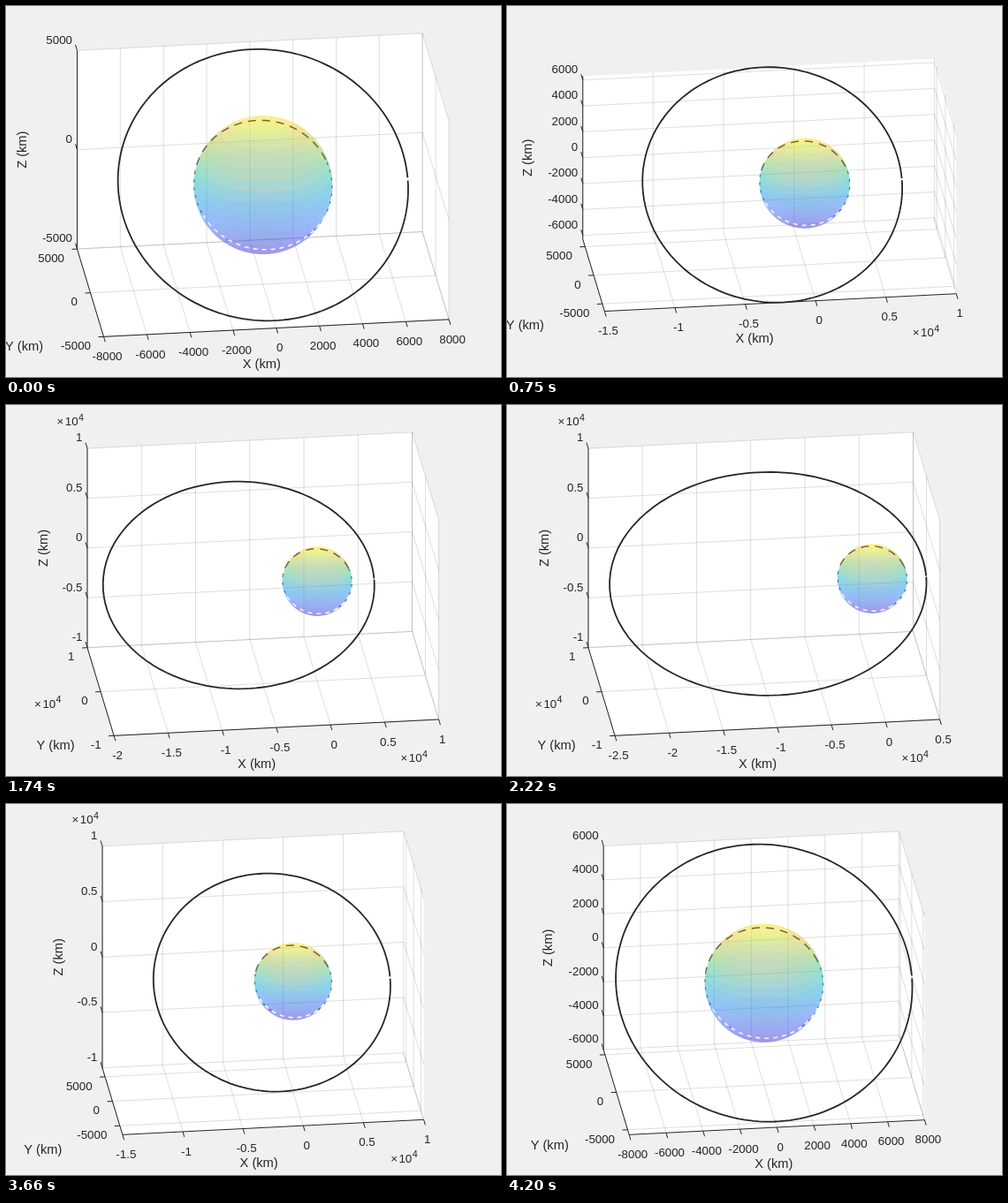
These frames come from a looping animation (560 by 420 pixels, 4.23 s). An HTML page with a canvas:

```html
<!DOCTYPE html>
<html lang="en">
<head>
<meta charset="utf-8">
<title>Orbit with changing eccentricity</title>
<style>
  html, body { margin: 0; width: 100%; height: 100%; overflow: hidden; background: #f0f0f0; }
  canvas { display: block; width: 560px; height: 420px; }
</style>
</head>
<body>
<canvas id="stage" width="560" height="420"></canvas>
<script>
const ctx = document.getElementById('stage').getContext('2d');
const ball = document.createElement('canvas');
ball.width = ball.height = 180;
const ballCtx = ball.getContext('2d');

const STEP = 30, COUNT = 141, TURN = 70;
const RAD = Math.PI / 180;
const CA = Math.cos(7 * RAD), SA = Math.sin(7 * RAD);
const CE = Math.cos(24 * RAD), SE = Math.sin(24 * RAD);
const HALF = Math.SQRT1_2;      // sine and cosine of the 45 degree inclination
const PLANET = 3.19;            // lengths are in thousands of km
const INK = '#262626';
const FONT = '"Liberation Sans", Arial, sans-serif';

const RAMP = [
  [62, 38, 168], [71, 66, 226], [69, 95, 252], [46, 130, 250], [34, 156, 232],
  [10, 178, 210], [48, 196, 160], [118, 204, 104], [190, 196, 50],
  [252, 192, 58], [249, 251, 21]
];

function rampColor(t) {
  const p = Math.max(0, Math.min(0.9999, t)) * (RAMP.length - 1);
  const i = Math.floor(p), f = p - i;
  return RAMP[i].map((c, j) => c + (RAMP[i + 1][j] - c) * f);
}

const BANDS = Array.from({ length: 20 }, (_, i) =>
  rampColor((Math.sin((i * 9 - 85.5) * RAD) + 1) / 2));

function bandColor(z) {
  const lat = Math.asin(Math.max(-1, Math.min(1, z))) / RAD;
  return BANDS[Math.min(19, Math.floor((lat + 90) / 9))];
}

function ticks(lo, hi, step) {
  const out = [];
  for (let v = Math.ceil(lo / step - 1e-6) * step; v <= hi + 1e-6; v += step) out.push(v);
  return out;
}

function orbitAt(k) {
  const e = (TURN - Math.abs(k - TURN)) / 100;
  const a = (k > TURN ? 8 : 6.7) + 10 * e;
  return { a, e, spread: a * Math.sqrt(1 - e * e) * HALF };
}

function axesFor({ a, e, spread }) {
  const far = a * (1 + e), near = a * (1 - e);
  const small = far < 8.001;
  const x0 = small ? -8 : -5 * Math.ceil(far / 5 - 1e-6);
  const x1 = small ? 8 : near <= 5 ? 5 : 10;
  const y = spread <= 5 ? 5 : spread < 6.85 ? spread : 10;
  const z = spread <= 5 ? 5 : spread <= 6 ? 6 : spread < 6.667 ? spread : 10;

  const w = (x1 - x0) * CA + 2 * y * SA;
  const h = (x1 - x0) * SA * SE + 2 * y * CA * SE + 2 * z * CE;
  let s = 343.5 / h, cx = 290.8;
  if (s * w > 434) {
    s = 434 / w;
    if (z < 10) { s = 422.5 / w; cx = 297; }
  }
  const mid = (x0 + x1) / 2;
  const at = (px, py, pz) => [
    cx + s * (CA * (px - mid) - SA * py),
    202.6 - s * (SA * SE * (px - mid) + CA * SE * py + CE * pz)
  ];
  return {
    x0, x1, y, z, s, at, bigX: !small, bigY: y === 10, bigZ: z === 10,
    xt: ticks(x0, x1, small ? 2 : 5),
    yt: ticks(-y, y, y === 10 ? 10 : 5),
    zt: ticks(-z, z, z === 10 || z === 5 ? 5 : 2)
  };
}

function path(points) {
  ctx.beginPath();
  points.forEach(p => ctx.lineTo(p[0], p[1]));
}

function stroke(points, color, width) {
  path(points);
  ctx.strokeStyle = color;
  ctx.lineWidth = width;
  ctx.stroke();
}

function text(str, x, y, align, size) {
  ctx.font = size + 'px ' + FONT;
  ctx.textAlign = align;
  ctx.fillStyle = INK;
  ctx.fillText(str, x, y + size * 0.355);
}

function power(x, y) {
  text('×', x, y, 'left', 13.33);
  text('10', x + 9.3, y, 'left', 13.33);
  text('4', x + 24.5, y - 4.5, 'left', 10.7);
}

const label = (v, big) => String(big ? v / 10 : v * 1000);

function drawPanes(ax) {
  const { x0, x1, y, z, at } = ax;
  path([at(x0, y, z), at(x1, y, z), at(x1, -y, z), at(x1, -y, -z), at(x0, -y, -z), at(x0, y, -z)]);
  ctx.fillStyle = '#fff';
  ctx.fill();
  const grid = 'rgba(38,38,38,0.15)';
  for (const v of ax.xt) {
    stroke([at(v, y, z), at(v, y, -z)], grid, 1);
    stroke([at(v, y, -z), at(v, -y, -z)], grid, 1);
  }
  for (const v of ax.yt) {
    stroke([at(x0, v, -z), at(x1, v, -z)], grid, 1);
    stroke([at(x1, v, -z), at(x1, v, z)], grid, 1);
  }
  for (const v of ax.zt) {
    stroke([at(x0, y, v), at(x1, y, v)], grid, 1);
    stroke([at(x1, y, v), at(x1, -y, v)], grid, 1);
  }
}

function drawRulers(ax) {
  const { x0, x1, y, z, at } = ax;
  const top = at(x0, y, z), back = at(x0, y, -z);
  const left = at(x0, -y, -z), right = at(x1, -y, -z);
  stroke([top, back, left, right], INK, 1);

  const mark = (p, dx, dy) => stroke([p, [p[0] + dx, p[1] + dy]], INK, 1);
  for (const v of ax.xt) {
    const p = at(v, -y, -z);
    mark(p, 1.8, 6);
    text(label(v, ax.bigX), p[0] + 4, p[1] + 22, 'center', 13.33);
  }
  for (const v of ax.yt) {
    const p = at(x0, v, -z);
    mark(p, -6, 0.3);
    text(label(v, ax.bigY), p[0] - 14.5, p[1] + 10, 'right', 13.33);
  }
  for (const v of ax.zt) {
    const p = at(x0, y, v);
    mark(p, -2, -6.5);
    text(label(v, ax.bigZ), p[0] - 5.5, p[1] - 12.5, 'right', 13.33);
  }

  const len = right[0] - left[0], rise = left[1] - back[1];
  if (ax.bigX) power(right[0] - 31 - 0.21 * (len - 310), right[1] + 43.5);
  if (ax.bigY) power(left[0] - 90, left[1] - 36.5);
  if (ax.bigZ) power(top[0] - 34.5, top[1] - 30.5);

  text('X (km)', (left[0] + right[0]) / 2 - 9 - 0.23 * (len - 310) + (ax.bigX ? 0 : 11),
    (left[1] + right[1]) / 2 + 40.3, 'center', 14.67);
  text('Y (km)', left[0] - (ax.bigY ? 66 : 90), left[1] + 12 + (95 - rise) * 0.25, 'center', 14.67);
  ctx.save();
  ctx.translate(top[0] - (ax.bigZ ? 50 : 63), (top[1] + back[1]) / 2);
  ctx.rotate(-Math.PI / 2);
  text('Z (km)', 0, 0, 'center', 14.67);
  ctx.restore();
}

// Translucent banded sphere: the far side shows through the near side.
function drawPlanet(ax) {
  const [cx, cy] = ax.at(0, 0, 0);
  const r = PLANET * ax.s, n = ball.width, alpha = 0.3;
  const total = 1 - (1 - alpha) ** 2;
  const left = Math.floor(cx) - n / 2, top = Math.floor(cy) - n / 2;
  const img = ballCtx.createImageData(n, n);
  for (let j = 0; j < n; j++) {
    for (let i = 0; i < n; i++) {
      const u = (left + i + 0.5 - cx) / r, v = (cy - top - j - 0.5) / r;
      const d = Math.hypot(u, v);
      const cover = Math.min(1, (1 - d) * r + 0.5);
      if (cover <= 0) continue;
      const w = Math.sqrt(Math.max(0, 1 - d * d));
      const near = bandColor(v * CE + w * SE), far = bandColor(v * CE - w * SE);
      const o = (j * n + i) * 4;
      for (let c = 0; c < 3; c++) {
        img.data[o + c] = (alpha * near[c] + alpha * (1 - alpha) * far[c]) / total;
      }
      img.data[o + 3] = 255 * total * cover;
    }
  }
  ballCtx.putImageData(img, 0, 0);
  ctx.drawImage(ball, left, top);
}

function ring(ax, from, to, radius) {
  const pts = [];
  for (let i = 0; i <= 180; i++) {
    const q = from + (to - from) * i / 180, r = radius(q);
    const side = r * Math.sin(q) * HALF;
    pts.push(ax.at(r * Math.cos(q), side, side));
  }
  return pts;
}

function drawSeam(ax) {
  const arc = (a, b) => ring(ax, a * RAD, b * RAD, () => PLANET);
  ctx.setLineDash([9, 7]);
  stroke(arc(20, 165), 'rgba(70,60,30,0.75)', 1.5);
  ctx.setLineDash([3, 6]);
  stroke(arc(165, 235), 'rgba(50,50,60,0.65)', 1.2);
  stroke(arc(305, 380), 'rgba(50,50,60,0.65)', 1.2);
  ctx.setLineDash([5, 5]);
  stroke(arc(205, 330), 'rgba(255,255,255,0.9)', 1.6);
  ctx.setLineDash([]);
}

function draw(k) {
  const orbit = orbitAt(k), ax = axesFor(orbit);
  const p = orbit.a * (1 - orbit.e ** 2);
  ctx.fillStyle = '#f0f0f0';
  ctx.fillRect(0, 0, 560, 420);
  drawPanes(ax);
  drawPlanet(ax);
  drawSeam(ax);
  stroke(ring(ax, 0, 2 * Math.PI - 0.02, q => p / (1 + orbit.e * Math.cos(q))), INK, 1.8);
  drawRulers(ax);
}

let shown = -1;
const start = performance.now();
function tick() {
  const k = Math.floor((performance.now() - start) / STEP) % COUNT;
  if (k !== shown) draw(shown = k);
  requestAnimationFrame(tick);
}
tick();
</script>
</body>
</html>
```
